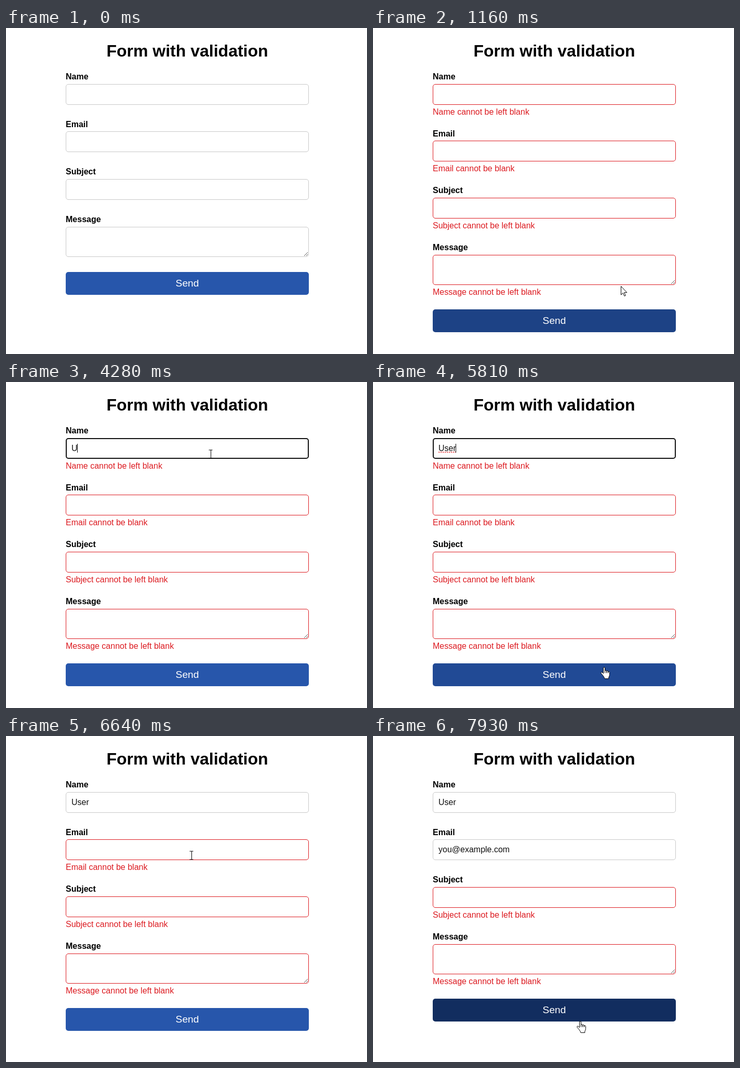
An HTML page for the animation above (8000 ms loop, 695x628 px).

```html
<!DOCTYPE html>
<html lang="en">
<head>
<meta charset="utf-8">
<title>Form with validation</title>
<style>
  html, body { margin: 0; width: 100%; height: 100%; overflow: hidden; background: #fff; }
  svg { display: block; font: 16px "Liberation Sans", Arial, sans-serif; }
  .title { font-size: 32px; font-weight: bold; text-anchor: middle; }
  .label { font-weight: bold; }
  .error { fill: #dc1a20; }
  .value { fill: #111; }
  .box { fill: none; }
  .grip { fill: none; stroke: #555; }
  .squiggle { stroke: #e23a3a; stroke-width: 1.5; stroke-dasharray: 2.5 1.5; }
  .send { fill: #fff; font-size: 19.2px; text-anchor: middle; }
  .pointer { stroke: #000; fill: #fff; stroke-linejoin: round; }
</style>
</head>
<body>
<svg id="stage" width="695" height="628" viewBox="0 0 695 628"></svg>
<script>
const LOOP = 8000, SUBMIT = 1030, FADE = 400, BLINK = 530;
const LEFT = 115, WIDTH = 468, CENTER = LEFT + WIDTH / 2, PAD = 11;
const FIRST_TOP = 108, PITCH = 275 / 3, ERROR_HEIGHT = 18;
const BUTTON_TOP = 470, BUTTON_HEIGHT = 44;
const stage = document.getElementById("stage");

function set(node, attrs) {
  for (const key in attrs) node.setAttribute(key, attrs[key]);
}
function add(parent, tag, attrs = {}, text = "") {
  const node = document.createElementNS("http://www.w3.org/2000/svg", tag);
  set(node, attrs);
  node.textContent = text;
  parent.append(node);
  return node;
}
const show = (node, visible) => set(node, { visibility: visible ? "visible" : "hidden" });
const clamp = u => Math.max(0, Math.min(1, u));
const smooth = u => u * u * (3 - 2 * u);
const fade = u => 1 - (1 - clamp(u) ** 1.3) ** 2.8; // close to the CSS "ease" curve

// typing starts at typeAt, one letter per keyGap; the error clears at fixedAt
const fields = [
  { label: "Name", error: "Name cannot be left blank", text: "User",
    focusAt: 3350, typeAt: 4280, keyGap: 153, spellAt: 5670, blurAt: 5960, fixedAt: 6060 },
  { label: "Email", error: "Email cannot be blank", text: "you@example.com",
    focusAt: 6790, typeAt: 6860, keyGap: 24, blurAt: 7700, fixedAt: 7800 },
  { label: "Subject", error: "Subject cannot be left blank" },
  { label: "Message", error: "Message cannot be left blank", height: 58 },
].map((field, i) => ({
  height: 40, text: "", focusAt: LOOP, typeAt: LOOP, spellAt: LOOP, blurAt: LOOP, fixedAt: LOOP,
  top: FIRST_TOP + Math.floor(i * PITCH), labelTop: FIRST_TOP - 9 + Math.round(i * PITCH), ...field,
}));

add(stage, "text", { class: "title", x: CENTER, y: 55 }, "Form with validation");

for (const f of fields) {
  f.group = add(stage, "g");
  add(f.group, "text", { class: "label", x: LEFT, y: f.labelTop - f.top }, f.label);
  f.box = add(f.group, "rect", { class: "box" });
  f.message = add(f.group, "text", { class: "error", x: LEFT, y: f.height + 19 }, f.error);
  f.value = add(f.group, "text", { class: "value", x: LEFT + PAD, y: 25 });
  f.squiggle = add(f.group, "path", { class: "squiggle", d: `M${LEFT + PAD} 27.2h34` });
  f.caret = add(f.group, "rect", { y: 11, width: 1, height: 17 });
  if (f.height > 40) add(f.group, "path", { class: "grip", d: "M574 56l7-7M578 56l3-3" });
}

const button = add(stage, "g");
const buttonBox = add(button, "rect", { x: LEFT, width: WIDTH, height: BUTTON_HEIGHT, rx: 5 });
add(button, "text", { class: "send", x: CENTER, y: 28 }, "Send");

const pointer = add(stage, "g", { class: "pointer" });
const shapes = {
  arrow: add(pointer, "path", { d: "M.5.5V17l3.8-3.6 2.7 6 2.3-1-2.6-5.8h5.2z" }),
  beam: add(pointer, "path", { d: "M-3.5-8h7M-3.5 8h7M.5-8V8" }),
  hand: add(pointer, "path", { d: "M-1.5 12V2a1.5 1.5 0 0 1 3 0v9.5V7q1.8-.8 3.2.5v4V7.6q1.9-.7 3 .8v3V8.8" +
    "q2.6-.5 2.8 1.7v4q0 3-1.7 5.3v2.7H1q-.5-2.5-3.5-6.3l-3.4-4q-1-1.8.6-2.3 1.8-.2 3.8 2.6z" }),
};

// each move bends towards "via" on its way from the previous resting place
const entry = [606, 612];
const moves = [
  { start: 180, end: 780, via: [530, 505], to: [477, 497] },
  { start: 1580, end: 2400, to: [640, 522] },
  { start: 2600, end: 3090, via: [431, 227], to: [388, 138] },
  { start: 3350, end: 3420, to: [394, 139] },
  { start: 5010, end: 5470, via: [580, 360], to: [462, 536] },
  { start: 5680, end: 5770, to: [445, 549] },
  { start: 6230, end: 6570, to: [357, 230] },
  { start: 7200, end: 7620, to: [399, 549] },
];
const hovers = [{ start: 540, end: 1036 }, { start: 5735, end: 6287 }, { start: 7540, end: LOOP }];

function pointerAt(t) {
  let place = entry;
  for (const { start, end, via, to } of moves) {
    if (t < start) break;
    const s = smooth(clamp((t - start) / (end - start)));
    place = place.map((from, axis) => {
      const bend = via ? via[axis] : (from + to[axis]) / 2;
      return (1 - s) ** 2 * from + 2 * s * (1 - s) * bend + s * s * to[axis];
    });
  }
  return place.map(Math.round);
}

function buttonColor(t) {
  let dark = 0;
  for (const { start, end } of hovers) dark += fade((t - start) / FADE) - fade((t - end) / FADE);
  const mix = (a, b) => Math.round(a + (b - a) * dark);
  return `rgb(${mix(39, 18)},${mix(86, 45)},${mix(171, 95)})`;
}

function drawField(f, t, top, invalid) {
  const focused = t >= f.focusAt && t < f.blurAt;
  const inset = focused ? 1 : .5;
  set(f.group, { transform: `translate(0 ${top})` });
  set(f.box, {
    x: LEFT + inset, y: inset, width: WIDTH - 2 * inset, height: f.height - 2 * inset, rx: 5 - inset,
    stroke: focused ? "#101010" : invalid ? "#dc1a20" : "#c8c8c8", "stroke-width": 2 * inset,
  });
  show(f.message, invalid);
  show(f.squiggle, focused && t >= f.spellAt);

  const typed = t < f.typeAt ? 0 : Math.min(f.text.length, 1 + Math.floor((t - f.typeAt) / f.keyGap));
  f.value.textContent = f.text.slice(0, typed);
  const blinkStart = typed ? f.typeAt + (typed - 1) * f.keyGap : f.focusAt;
  show(f.caret, focused && Math.floor((t - blinkStart) / BLINK) % 2 === 0);
  set(f.caret, { x: Math.floor(LEFT + PAD + (typed ? f.value.getComputedTextLength() : 0)) });
}

function draw(t) {
  const [x, y] = pointerAt(t);
  const over = (top, height) => x >= LEFT && x < LEFT + WIDTH && y >= top && y < top + height;
  let shift = 0, kind = "arrow";
  for (const f of fields) {
    const invalid = t >= SUBMIT && t < f.fixedAt;
    if (over(f.top + shift, f.height)) kind = "beam";
    drawField(f, t, f.top + shift, invalid);
    if (invalid) shift += ERROR_HEIGHT;
  }
  const top = BUTTON_TOP + shift;
  if (over(top, BUTTON_HEIGHT)) kind = "hand";
  set(button, { transform: `translate(0 ${top})` });
  set(buttonBox, { fill: buttonColor(t) });

  set(pointer, { transform: `translate(${x} ${y})` });
  for (const name in shapes) show(shapes[name], name === kind && t >= moves[0].start);
}

function tick() {
  draw(performance.now() % LOOP);
  requestAnimationFrame(tick);
}
tick();
</script>
</body>
</html>
```
